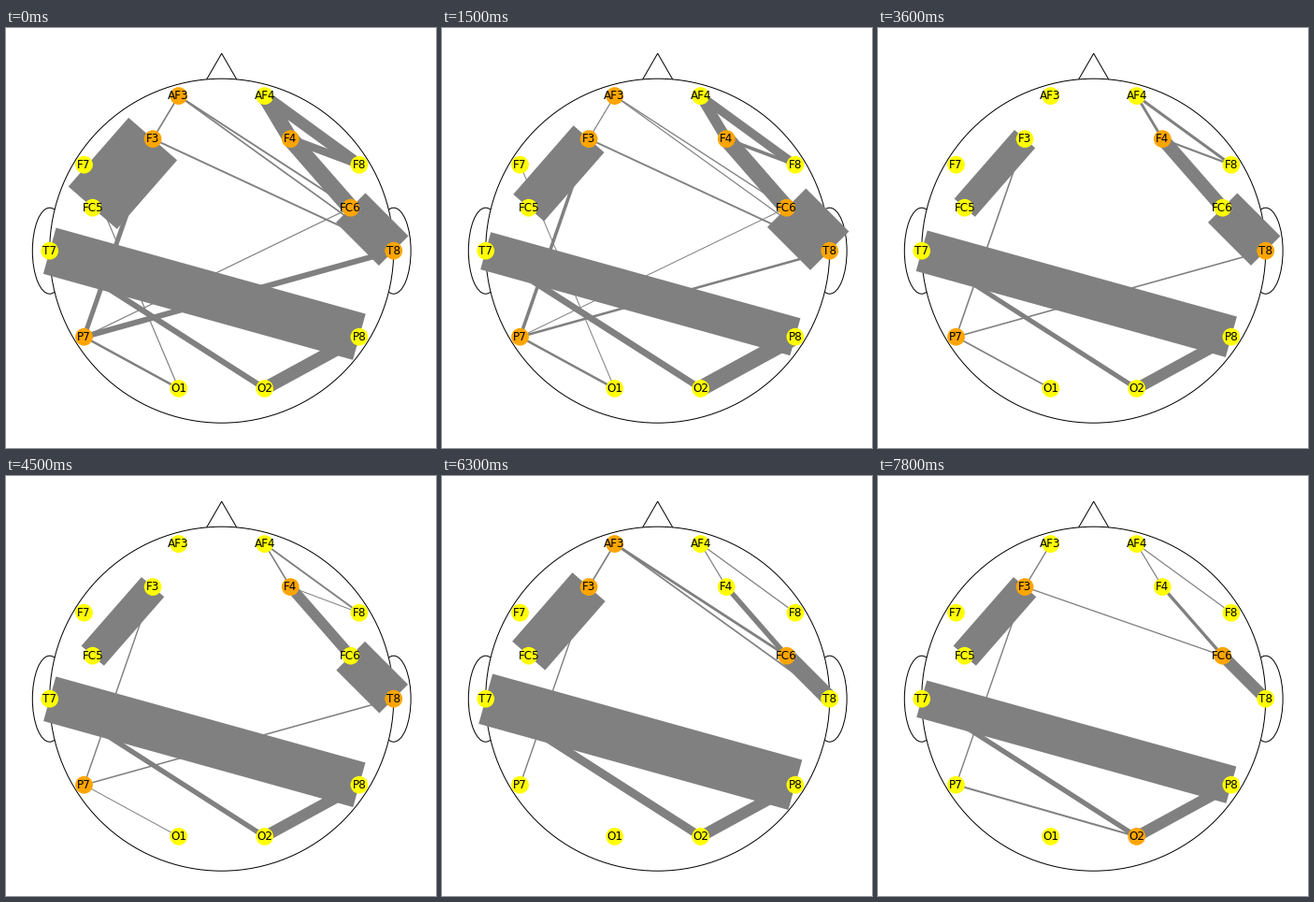
These frames come from a looping animation (460 by 449 pixels, 8 s). A matplotlib script:

```python
from math import exp

import matplotlib.pyplot as plt
from matplotlib.animation import FuncAnimation
from matplotlib.patches import Circle, Ellipse, RegularPolygon

W, H, DPI = 460, 449, 72
CX, CY, R = 230.7, 238.2, 184           # head centre and radius in pixels
INTERVAL, FRAMES, FRAMES_PER_STEP = 100, 80, 3
MIN_WIDTH = 0.6                         # thinner links are not shown
HUB_DEGREE = 3                          # nodes with this many links turn orange

# Right-hand electrodes in head radii; the left side mirrors them.
PAIRS = {
    ("AF3", "AF4"): (0.25, 0.9), ("F3", "F4"): (0.4, 0.65),
    ("F7", "F8"): (0.8, 0.5), ("FC5", "FC6"): (0.75, 0.25),
    ("T7", "T8"): (1, 0), ("P7", "P8"): (0.8, -0.5),
    ("O1", "O2"): (0.25, -0.8),
}
NODES = {}
for (left, right), (x, y) in PAIRS.items():
    NODES[left], NODES[right] = (-x, y), (x, y)


def bump(t, peak, height, spread):
    """Swell and fade around the peak step."""
    return height * exp(-((t - peak) / spread) ** 2)


def drop(t, middle, height, ease=1.2):
    """Hold the height, then ease down to zero around the middle step."""
    return height / (1 + exp((t - middle) / ease))


# Link width in pixels as a function of the step.
LINKS = {
    "F3 FC5": lambda t: 29 + bump(t, 0, 40, 5) + bump(t, 20.5, 18, 4.2),
    "T7 P8": lambda t: (39.5 + bump(t, 0, 11.5, 1.5) + bump(t, 10, 5, 5)
                        + bump(t, 19, 20, 4.2)),
    "FC6 T8": lambda t: 12.5 + drop(t, 19, 32) + bump(t, 5, 14, 2.4),
    "F4 FC6": lambda t: 2.5 + drop(t, 16, 15.5, 3.5),
    "F4 T8": lambda t: drop(t, 19, 2),
    "AF4 F4": lambda t: 1.2 + bump(t, 0, 15, 8),
    "AF4 F8": lambda t: 1.2 + bump(t, 0, 11, 9),
    "F4 F8": lambda t: bump(t, 0, 6, 4) + drop(t, 14.5, 2.4),
    "AF3 F3": lambda t: drop(t, 6, 1.7) + bump(t, 23, 2, 5),
    "AF3 FC6": lambda t: drop(t, 6, 1.9) + bump(t, 21, 2.8, 2.8),
    "AF3 T8": lambda t: drop(t, 6, 1.7) + bump(t, 21, 1.7, 3),
    "F3 T8": lambda t: drop(t, 10, 1.9),
    "F3 FC6": lambda t: bump(t, 3, 1.3, 2) + bump(t, 26, 1.3, 3),
    "F3 P7": lambda t: 1.4 + bump(t, 0, 3.6, 7),
    "P7 FC6": lambda t: drop(t, 6, 1.2),
    "P7 T8": lambda t: bump(t, 0, 4.5, 4) + drop(t, 19, 1.6),
    "P7 O1": lambda t: drop(t, 13.5, 2.5, 2),
    "F7 O1": lambda t: drop(t, 6, 1.2),
    "T7 O2": lambda t: 5 + bump(t, 3, 3, 3) + bump(t, 20.5, 4, 3.5),
    "O2 P8": lambda t: 12 + bump(t, 4, 5.5, 4),
    "P7 O2": lambda t: bump(t, 26, 2, 3),
}

fig = plt.figure(figsize=(W / DPI, H / DPI), dpi=DPI, facecolor="white")
ax = fig.add_axes([0, 0, 1, 1])
ax.set_xlim(-CX / R, (W - CX) / R)
ax.set_ylim((CY - H) / R, CY / R)
ax.axis("off")

outline = dict(facecolor="white", edgecolor="black", linewidth=1)
ax.add_patch(RegularPolygon((0, 1), 3, radius=0.147, zorder=1, **outline))
for side in (-1, 1):
    ax.add_patch(Ellipse((side, 0), 0.2, 0.5, zorder=1, **outline))
ax.add_patch(Circle((0, 0), 1, zorder=2, **outline))

links = []
for name, width_at in LINKS.items():
    a, b = name.split()
    line, = ax.plot(*zip(NODES[a], NODES[b]), color="gray",
                    solid_capstyle="butt", zorder=3)
    links.append((a, b, line, width_at))

dots = {}
for name, pos in NODES.items():
    dots[name] = ax.add_patch(Circle(pos, 0.051, linewidth=0, zorder=4))
    ax.text(*pos, name, fontsize=12, family="DejaVu Sans",
            ha="center", va="center", zorder=5)


def update(frame):
    step = frame // FRAMES_PER_STEP
    degree = dict.fromkeys(NODES, 0)
    for a, b, line, width_at in links:
        width = width_at(step)
        shown = width >= MIN_WIDTH
        line.set_visible(shown)
        line.set_linewidth(max(width, 1))
        degree[a] += shown
        degree[b] += shown
    for name, dot in dots.items():
        dot.set_facecolor("orange" if degree[name] >= HUB_DEGREE else "yellow")
    return [link[2] for link in links] + list(dots.values())


anim = FuncAnimation(fig, update, frames=FRAMES, interval=INTERVAL,
                     repeat=True, repeat_delay=0, blit=False)
plt.show()
```
